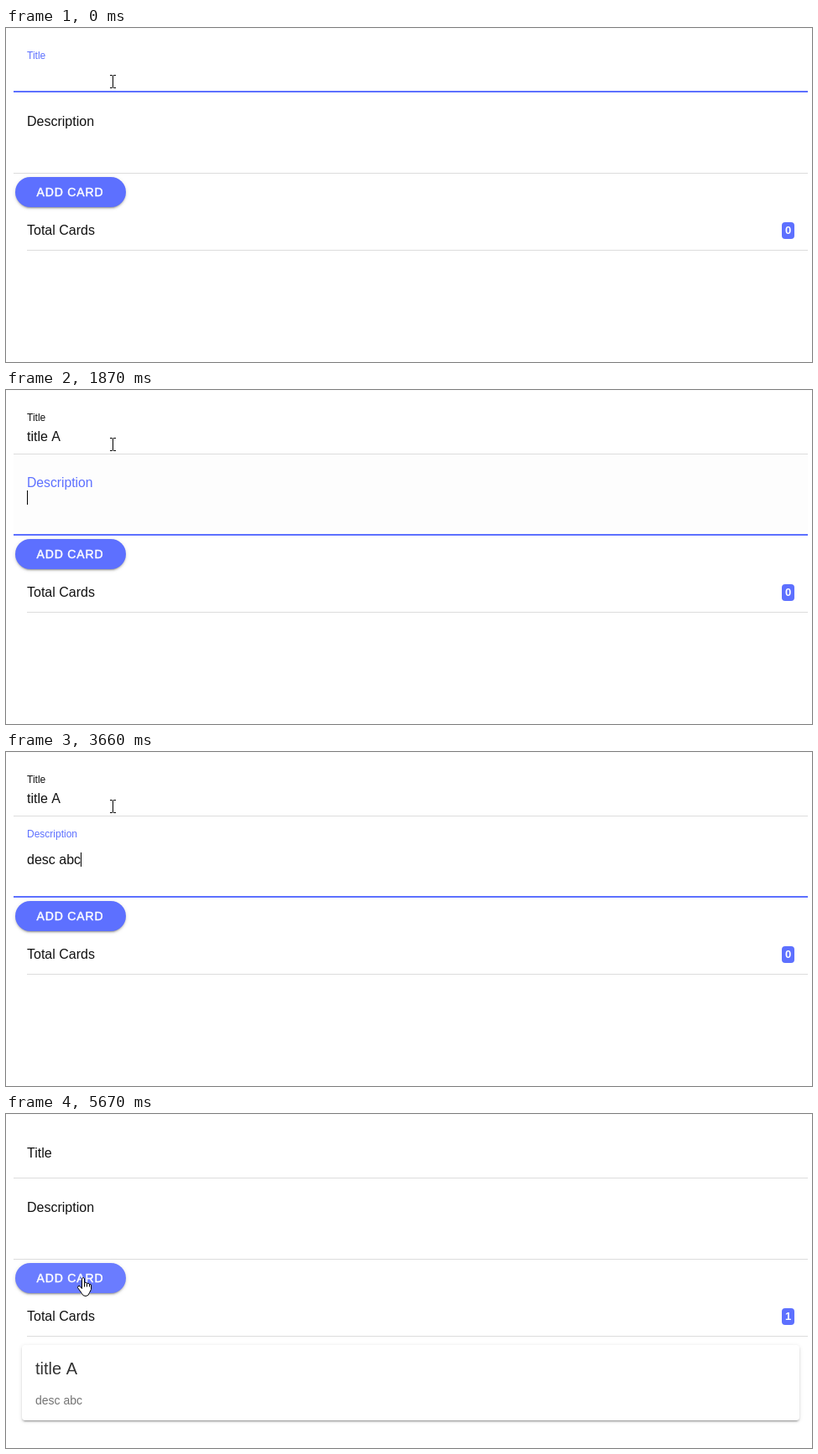
An HTML page for the animation above (5.91 s loop, 961x399 px).

```html
<!DOCTYPE html>
<html lang="en">
<head>
<meta charset="utf-8">
<title>Add card form</title>
<style>
  html, body { margin: 0; width: 100%; height: 100%; overflow: hidden; background: #fff; }
  div, svg { position: absolute; }
  svg { left: 0; top: 0; font: 16px "Liberation Sans", Arial, sans-serif; }
  text { white-space: pre; }
  .typed { font-kerning: none; }
  .raised { box-shadow: 0 3px 1px -2px rgba(0,0,0,.2), 0 2px 2px rgba(0,0,0,.14), 0 1px 5px rgba(0,0,0,.12); }
  #button { left: 11px; top: 178px; width: 132px; height: 36px; border-radius: 18px; overflow: hidden; }
  #ripple { left: -58px; top: -122px; width: 280px; height: 280px; border-radius: 50%; background: #fff; }
  #badge { left: 925px; top: 232px; width: 15px; height: 20px; border-radius: 4px; background: #5d70ff; }
  #card { left: 19px; top: 276px; width: 927px; height: 90px; border-radius: 4px; }
</style>
</head>
<body>
<div id="button" class="raised"><div id="ripple"></div></div>
<div id="badge"></div>
<div id="card" class="raised"></div>
<svg width="961" height="399" fill="#111">
  <path d="M0 0h961v1H0z" fill="#fafafa"/>
  <path id="shade" d="M9 76h947v97H9z" fill="#e0e0e0"/>
  <path d="M9 76h947v1H9zM9 173h947v1H9zM25 265h931v1H25z" fill="#dcdcdc"/>
  <path id="titleLine" d="M9 75h947v2H9z" fill="#5d70ff"/>
  <path id="descLine" d="M9 172h947v2H9z" fill="#5d70ff"/>
  <text id="titleLabel">Title</text>
  <text id="descLabel">Description</text>
  <text id="titleText" class="typed" x="25" y="61"></text>
  <text id="descText" class="typed" x="25" y="134"></text>
  <rect id="caret" width="1" height="17" fill="#000"/>
  <text x="36.5" y="201" font-size="14" letter-spacing=".84" fill="#fff" stroke="#fff" stroke-width=".45">ADD CARD</text>
  <text x="25" y="247">Total Cards</text>
  <text id="count" x="932.5" y="246" font-size="13" font-weight="bold" fill="#fff" text-anchor="middle"></text>
  <g id="cardText" class="typed">
    <text x="35" y="311" font-size="20" fill="#333">title A</text>
    <text x="35" y="347" font-size="14" fill="#737373">desc abc</text>
  </g>
  <path id="beam" fill="#000" d="M0 0h3v1h1v-1h3v1h-3v14h3v1h-3v-1h-1v1h-3v-1h3v-14h-3z"/>
  <path id="hand" fill="#fff" stroke="#000" stroke-linejoin="round"
    d="M5.5 13.5V1.5Q7-.5 8.5 1.5V6.5Q10 5 11.5 7.5 13 6 14.5 8.5 16.5 7.5 16.5 10V14.5L14.5 18.5Q13.5 22.5 10 22.5 6.5 22.5 5.5 19.5L.5 12.5Q.5 9.5 3 10.5ZM8.5 6.5V11.5M11.5 7.5V11.5M14.5 8.5V11.5"/>
</svg>
<script>
const LOOP = 5910, FOCUS_DESC = 1870, HOVER = 4590, PRESS = 4970, SUBMIT = 5130, ADDED = 5210;
const BLUE = '#5d70ff';
const $ = id => document.getElementById(id);
const show = (id, on) => { $(id).style.visibility = on ? 'visible' : 'hidden'; };

const ramp = (t, from, to) => Math.min(1, Math.max(0, (t - from) / (to - from)));
const smooth = (t, from, to) => {
  const p = ramp(t, from, to);
  return p * p * (3 - 2 * p);
};
const easeOut = p => 1 - (1 - p) ** 3;
const mix = (a, b, p) => a + (b - a) * p;

// Bursts of evenly spaced keystrokes
const burst = (start, gap, ...keys) => keys.map((key, i) => ({ time: start + i * gap, key }));
const typing = {
  title: [...burst(230, 153, 'ti', 't', 'l', 'e'), ...burst(1320, 230, ' ', 'A')],
  desc: [...burst(2340, 156, 'd', 'e', 's', 'c'), ...burst(3110, 183, ' ', 'a', 'b', 'c')]
};

function drawField(name, low, high, float, focused, t) {
  const keys = t < SUBMIT ? typing[name].filter(k => k.time <= t) : [];
  $(name + 'Text').textContent = keys.map(k => k.key).join('');
  $(name + 'Label').setAttribute('transform',
    `translate(25 ${mix(low, high, float)}) scale(${1 - float / 4})`);
  $(name + 'Label').setAttribute('fill', focused ? BLUE : '#111');
  show(name + 'Line', focused);
  if (focused) drawCaret(name, keys, t);
}

// The caret blinks, restarting at each keystroke
function drawCaret(name, keys, t) {
  const idle = name === 'title' ? -550 : FOCUS_DESC;
  const since = t - (keys.length ? keys[keys.length - 1].time : idle);
  show('caret', since % 1100 < 550);
  $('caret').setAttribute('x', Math.round(25 + $(name + 'Text').getComputedTextLength()));
  $('caret').setAttribute('y', name === 'title' ? 47 : 120);
}

function drawPointer(t) {
  const p = easeOut(ramp(t, 4300, 4740));
  const x = Math.round(mix(124, 85, p));
  const y = Math.round(mix(t < 1620 ? 56 : 57, 195, p));
  const hover = t >= HOVER;
  show('beam', !hover);
  show('hand', hover);
  $(hover ? 'hand' : 'beam').setAttribute('transform', `translate(${x} ${y})`);
  $('button').style.background = hover ? '#6a7cff' : BLUE;
}

function draw(t) {
  const sink = smooth(t, 5150, 5340);
  const rise = smooth(t, 1840, 2030);
  show('caret', false);
  drawField('title', 52, 37, 1 - sink, t < FOCUS_DESC, t);
  drawField('desc', 117, 102, rise - sink, t >= FOCUS_DESC && t < PRESS, t);
  $('shade').style.opacity = t < 2340 ? rise : 0;
  $('ripple').style.transform = `scale(${easeOut(ramp(t, PRESS, 5200))})`;
  $('ripple').style.opacity = .05 * (1 - ramp(t, 5520, 5670));
  $('count').textContent = t < SUBMIT ? 0 : 1;
  show('card', t >= ADDED);
  show('cardText', t >= ADDED);
  drawPointer(t);
}

const start = performance.now();
function tick() {
  draw((performance.now() - start) % LOOP);
  requestAnimationFrame(tick);
}
tick();
</script>
</body>
</html>
```
